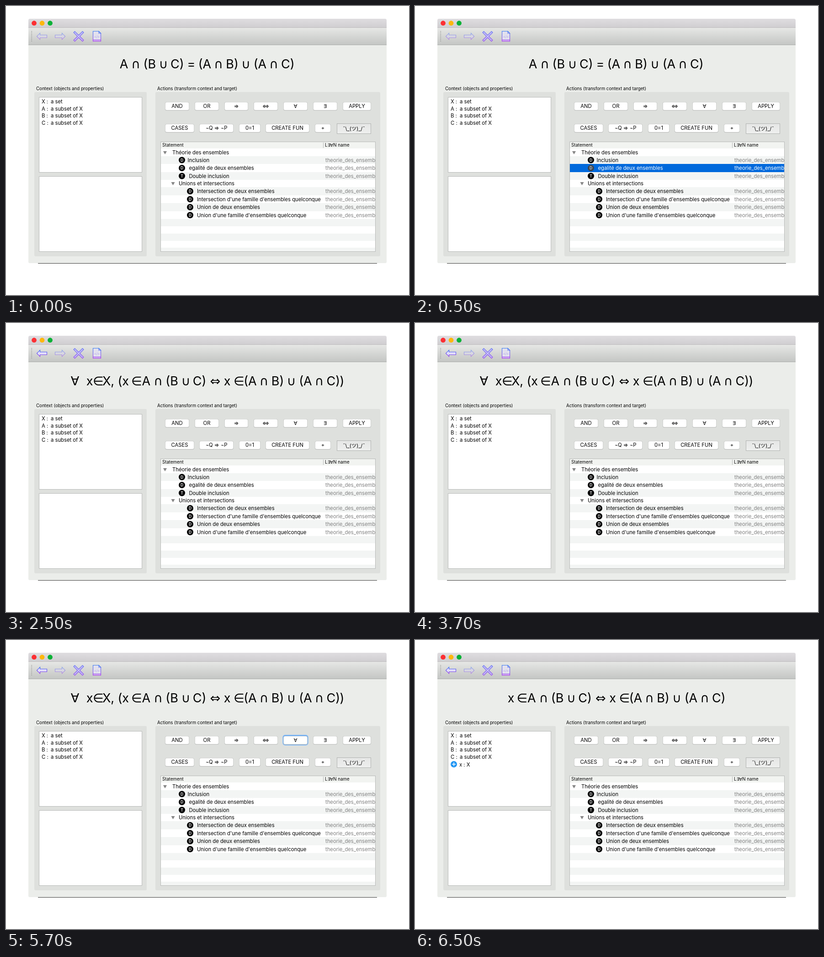
These frames come from a looping animation (882 by 635 pixels, 8000 ms). An HTML page with a canvas:

```html
<!DOCTYPE html>
<html lang="fr">
<head>
<meta charset="utf-8">
<title>Théorie des ensembles</title>
<style>
html, body { margin: 0; width: 100%; height: 100%; overflow: hidden; background: #fff; }
canvas { display: block; width: 882px; height: 635px; }
</style>
</head>
<body>
<canvas id="stage" width="882" height="635"></canvas>
<script>
const c = document.getElementById('stage').getContext('2d');
const SANS = 'Inter, "DejaVu Sans", "Noto Sans CJK JP", "Noto Sans CJK", sans-serif';
const MATH = '"DejaVu Sans", sans-serif';
const LOOP = 8000;
const BODY = 11.25, SMALL = 9.7, TITLE = 27;

function text(s, x, y, size = BODY, color = '#000', align = 'left', family = SANS, weight = 400) {
  c.font = `${weight} ${size}px ${family}`;
  c.textAlign = align;
  c.fillStyle = color;
  c.fillText(s, x, y);
}

function rect(x, y, w, h, fill) {
  c.fillStyle = fill;
  c.fillRect(x, y, w, h);
}

function round(x, y, w, h, r, fill, stroke) {
  c.beginPath();
  c.roundRect(x, y, w, h, r);
  if (fill) { c.fillStyle = fill; c.fill(); }
  if (stroke) { c.strokeStyle = stroke; c.lineWidth = 1; c.stroke(); }
}

function disc(x, y, r, fill) {
  c.beginPath();
  c.arc(x, y, r, 0, 7);
  c.fillStyle = fill;
  c.fill();
}

function shade(y0, y1, ...colors) {
  const g = c.createLinearGradient(0, y0, 0, y1);
  colors.forEach((k, i) => g.addColorStop(i / (colors.length - 1), k));
  return g;
}

function outline(points, stroke, fill) {
  c.beginPath();
  points.forEach(([x, y]) => c.lineTo(x, y));
  c.closePath();
  if (fill) { c.fillStyle = fill; c.fill(); }
  if (stroke) { c.strokeStyle = stroke; c.lineWidth = 1.1; c.stroke(); }
}

function arrow(cx, dir, active) {
  const pts = [[-11, 0], [-4, -7], [-4, -3], [11, -3], [11, 3], [-4, 3], [-4, 7]];
  c.globalAlpha = active ? 1 : 0.48;
  outline(pts.map(([x, y]) => [cx + dir * x, 66.7 + y]),
    shade(59, 74, '#2f73f5', '#9a35ee'), active ? '#e3defa' : '#dcdaf0');
  c.globalAlpha = 1;
}

function cross() {
  const a = 2.6, b = 11, d = b - a;
  const pts = [[0, -a], [d, -b], [b, -d], [a, 0], [b, d], [d, b], [0, a], [-d, b], [-b, d], [-a, 0], [-b, -d], [-d, -b]];
  outline(pts.map(([x, y]) => [159 + x, 66.7 + y]), shade(55, 78, '#526ef5', '#9a48ee'), '#c5bdf6');
}

function page() {
  const ink = shade(55, 78, '#3f80f2', '#a63cec');
  outline([[190.5, 55.5], [203, 55.5], [207.5, 60], [207.5, 77.5], [190.5, 77.5]], ink, '#e2e0ee');
  outline([[203, 55.5], [203, 60], [207.5, 60]], ink);
  rect(191, 74, 16, 1, ink);
  rect(191, 75, 16, 2, '#d9b8f2');
  text('</>', 199, 69.5, 7, '#a49be8', 'center');
}

function frame(canGoBack) {
  round(49, 28, 784, 537, [4, 4, 3, 3], '#ebedea');
  round(49, 28, 784, 19, [4, 4, 0, 0], shade(28, 47, '#dfdde0', '#d0ced1'));
  rect(49, 47, 784, 1, '#bfbebf');
  rect(49, 48, 784, 37, shade(48, 85, '#e6e7e5', '#c4c6c4'));
  rect(49, 85, 784, 1, '#adafad');
  rect(70, 565, 742, 1, '#3c3c3c');
  ['#fc2f33', '#fdb70d', '#0bb137'].forEach((k, i) => disc(61.5 + 17.5 * i, 37.7, 5.4, k));
  for (let y = 55; y < 79; y += 3.5) rect(55.5, y, 1.3, 1.5, '#858785');
  arrow(78.5, 1, canGoBack);
  arrow(118.5, -1, false);
  cross();
  page();
}

// Formula pieces: [string, centre x]
const LEFT = [['A', 258], ['∩', 284], ['(B', 314.3], ['∪', 344.5], ['C)', 374.7]];
const RIGHT = [['(A', 435], ['∩', 465], ['B)', 495], ['∪', 525], ['(A', 556], ['∩', 586], ['C)', 616.7]];
const LINK = [['x', 210], ['∈', 234.5], ['⇔', 406.5], ['x', 432.5], ['∈', 458.5]];
const BOUND = [['∀', 151], ['x', 183], ['∈', 202], ['X,', 224], ['(', 249.5], [')', 735.5]];

function pieces(list, dx = 0) {
  for (const [s, x] of list)
    text(s, x + dx, 137, TITLE, '#000', 'center', /[∩∪∈⇔∀]/.test(s) ? MATH : SANS);
}

function formula(step) {
  if (step === 0) {
    pieces(LEFT);
    pieces([['=', 405.5]]);
    pieces(RIGHT);
    return;
  }
  const dx = step === 1 ? 51.5 : 0;
  pieces(LEFT, dx - 2.7);
  pieces(LINK, dx);
  pieces(RIGHT, dx + 48);
  if (step === 1) pieces(BOUND);
}

function box(x, y, w, h) {
  rect(x, y, w, h, '#b9bbb9');
  rect(x + 1, y + 1, w - 2, h - 2, '#fff');
}

function context(introduced) {
  text('Context (objects and properties)', 66, 184.7, SMALL);
  round(62, 189, 246, 361, 3, '#dee0dd');
  box(72, 200, 226, 166);
  box(72, 374, 226, 166);
  ['X', 'A', 'B', 'C'].forEach((name, i) => {
    const y = 213.7 + 15.8 * i;
    text(name + ' :', 78, y);
    text(i ? 'a subset of X' : 'a set', 98, y);
  });
  if (introduced) {
    disc(85, 273, 7, '#2196f3');
    rect(81, 272.3, 8, 1.5, '#fff');
    rect(84.3, 269, 1.5, 8, '#fff');
    text('x : X', 97, 277.5);
  }
}

const BUTTONS = [
  ['AND', 348, 53, 220], ['OR', 413, 53, 220], ['⇒', 478, 52, 220], ['⇔', 542, 53, 220],
  ['∀', 607, 53, 220], ['∃', 672, 53, 220], ['APPLY', 737, 62, 220],
  ['CASES', 348, 64, 268.3], ['¬Q ⇒ ¬P', 423, 75, 268.3], ['0=1', 510, 47, 268.3],
  ['CREATE FUN', 568, 96, 268.3], ['+', 676, 35, 268.3]
];

function button([label, x, w, y], focused) {
  if (focused) {
    round(x - 2, y - 12, w + 4, 24, 6, '#a9cdf3');
    round(x - 1, y - 11, w + 2, 22, 5, '#6eabef');
  }
  round(x, y - 9, w, 19, 4, '#bec0be');
  round(x + 0.7, y - 8.6, w - 1.4, 17.4, 3.5, '#fff');
  text(label, x + w / 2, y + 4, BODY, '#000', 'center');
}

function actions(focusAll) {
  text('Actions (transform context and target)', 331, 184.7, SMALL);
  round(327, 189, 492, 361, 3, '#dee0dd');
  BUTTONS.forEach(b => button(b, focusAll && b[0] === '∀'));
  rect(724, 258, 75, 23, '#b1b3b1');
  rect(725, 259, 73, 21, shade(259, 280, '#e5e6e5', '#eeefee'));
  text('¯\\_(ツ)_/¯', 761.5, 274, BODY, '#000', 'center');
}

// [label, text x, badge letter, badge x]
const ROWS = [
  ['Théorie des ensembles', 364, '', 348],
  ['Inclusion', 397.5, 'D', 385],
  ['egalité de deux ensembles', 400.5, 'D', 385],
  ['Double inclusion', 400.5, 'T', 385],
  ['Unions et intersections', 378, '', 365.5],
  ['Intersection de deux ensembles', 418, 'D', 403],
  ["Intersection d'une famille d'ensembles quelconque", 418, 'D', 403],
  ['Union de deux ensembles', 418, 'D', 403],
  ["Union d'une famille d'ensembles quelconque", 418, 'D', 403]
];

function row(i, y, h, selected) {
  rect(339, y, 469, h, selected ? '#0069dc' : i % 2 ? '#f3f5f4' : '#fff');
  if (!ROWS[i]) return;
  const [label, x, letter, bx] = ROWS[i];
  const mid = y + h / 2;
  text(label, x, mid + 4, BODY, selected ? '#fff' : '#000');
  if (!letter) {
    outline([[bx - 4, mid - 3], [bx + 4, mid - 3], [bx, mid + 4]], null, '#858585');
    return;
  }
  disc(bx, mid, 7, selected ? '#3e4650' : '#000');
  text(letter, bx, mid + 3, 8.5, selected ? '#c9d3de' : '#fff', 'center', SANS, 600);
  text('theorie_des_ensemb', 699, mid + 4, BODY, selected ? '#fff' : '#808080');
}

function table(selected) {
  box(338, 298, 471, 242);
  rect(339, 299, 469, 14, '#f2f4f1');
  rect(694, 300, 1, 12, '#b9bbb9');
  text('Statement', 342, 309.3, SMALL);
  text('L∃∀N name', 698, 309.3, SMALL);
  c.save();
  c.beginPath();
  c.rect(339, 313, 469, 226);
  c.clip();
  let y = 314;
  for (let i = 0; y < 540; i++) {
    const h = ROWS[i] && ROWS[i][2] ? 17.5 : 15.8;
    const top = Math.round(y);
    row(i, top, Math.round(y + h) - top, selected && i === 2);
    y += h;
  }
  c.restore();
}

function draw(t) {
  const step = t < 2500 ? 0 : t < 6500 ? 1 : 2;
  rect(0, 0, 882, 635, '#fff');
  frame(step > 0);
  formula(step);
  context(step === 2);
  actions(t >= 4500 && t < 6500);
  table(t >= 500 && t < 2500);
}

const start = performance.now();
function tick() {
  draw((performance.now() - start) % LOOP);
  requestAnimationFrame(tick);
}
tick();
</script>
</body>
</html>
```
